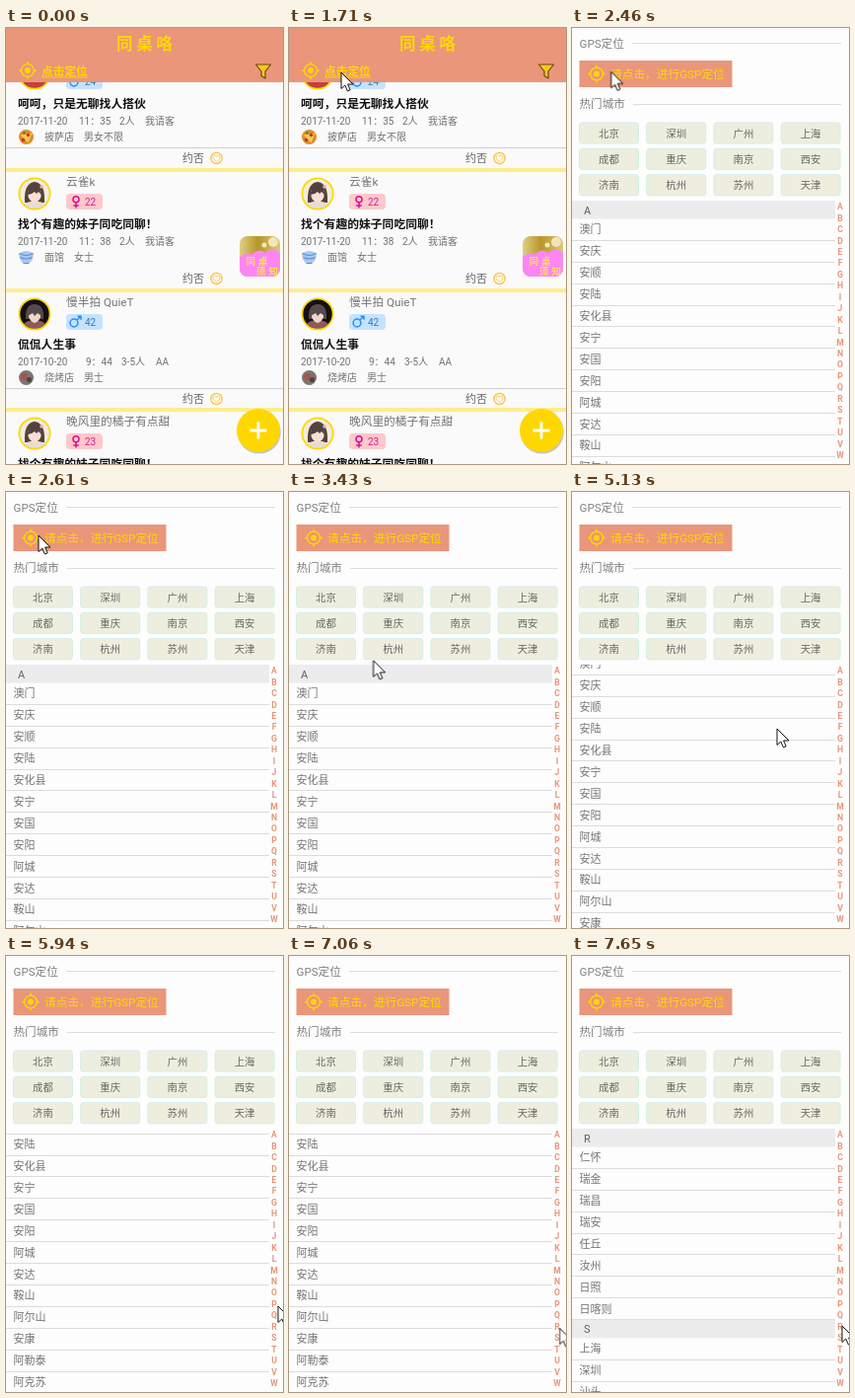
Animation, 281 px wide and 442 px high, one loop 8 s. Source, as an HTML page:

```html
<!DOCTYPE html>
<html lang="zh">
<head>
<meta charset="utf-8">
<title>同桌</title>
<style>
html, body { margin: 0; width: 100%; height: 100%; overflow: hidden; background: #fafafa; }
svg { display: block; }
text { font-family: Roboto, "Noto Sans CJK SC", "Noto Sans CJK", sans-serif; white-space: pre; }
</style>
</head>
<body>
<svg id="stage" width="100%" height="100%" viewBox="0 0 281 442"></svg>
<script>
const LOOP = 8000, SALMON = '#e9967a', GOLD = '#ffd700';

// y is the visual middle of the line
const text = (x, y, s, size, fill, extra = '') =>
  `<text x="${x}" y="${(y + size * 0.37).toFixed(2)}" font-size="${size}" fill="${fill}" ${extra}>${s}</text>`;
const rect = (x, y, w, h, fill, extra = '') =>
  `<rect x="${x}" y="${y}" width="${w}" height="${h}" fill="${fill}" ${extra}/>`;
const circle = (x, y, r, fill, extra = '') =>
  `<circle cx="${x}" cy="${y}" r="${r}" fill="${fill}" ${extra}/>`;
const path = (d, fill, extra = '') => `<path d="${d}" fill="${fill}" ${extra}/>`;
const at = (x, y, body) => `<g transform="translate(${x} ${y})">${body}</g>`;
const BOLD = 'font-weight="700"', MID = 'text-anchor="middle"';

const locate = (x, y) => at(x, y,
  circle(0, 0, 6.4, 'none', `stroke="${GOLD}" stroke-width="1.4"`) + circle(0, 0, 3, GOLD) +
  path('M0-9V-6M0 9V6M-9 0H-6M9 0H6', 'none', `stroke="${GOLD}" stroke-width="1.4"`));

// ---- post list ----
const ring = circle(0, 0, 15.6, 'none', `stroke="${GOLD}" stroke-width="1.8"`);
const avatars = {
  girl: circle(0, 0, 15.5, '#f3ebda') +
    path('M-10 9Q-11-11 0-12Q11-11 10 9Z', '#51423f') +
    path('M-10 11Q-6 7 0 8Q6 7 10 11Q0 19-10 11Z', '#e9dcd6') +
    path('M-6.5-3Q0-6 6.5-3V3Q5 8 0 9Q-5 8-6.5 3Z', '#fae0d2') +
    path('M-7 1Q-7-7 0-7Q7-7 7 1L4-2L2 0L0-2L-3 0Z', '#51423f') +
    circle(7, -7, 1.8, '#f0a9b4') + ring,
  dark: circle(0, 0, 15.5, '#141012') +
    path('M-11 10Q-6 5 0 7Q6 5 11 10Q0 20-11 10Z', '#8f5a5a') +
    path('M-9 5Q-10-10 0-10Q10-10 9 5Z', '#574a4c') +
    path('M-6-2Q0-5 6-2V3Q4 8 0 9Q-4 8-6 3Z', '#efd6cb') +
    path('M-7 2Q-6-6 0-6Q6-6 7 2L3-1L0 2L-2-1Z', '#574a4c') + ring,
  red: circle(0, 0, 15.5, '#8d2b2b') + path('M-13 8Q0 2 13 8Q0 22-13 8Z', '#c6403a') + ring
};
const icons = {
  pizza: circle(0, 0, 7.5, '#e08a2c') + path('M-6-2L6-4L2 6Z', '#f6c94c') +
    circle(-3, 3, 1.8, '#c23b22') + circle(2, -2, 1.8, '#c23b22') + circle(-2, -4, 1.4, '#5d8a35'),
  noodle: path('M-7.5-4Q0-9 7.5-4Q7 6 0 7Q-7 6-7.5-4Z', '#a9c8ee') +
    path('M-7-4Q0 0 7-4M-6 0Q0 3 6 0M-3 6H3', 'none', 'stroke="#5a8fd0" stroke-width="1.1"'),
  grill: circle(0, 0, 7.5, '#7d7472') + circle(-2, -1, 3.5, '#a3564c') + circle(3, 2, 2.6, '#4c4543')
};

function gender(male) {
  const stroke = `stroke="${male ? '#1e90ff' : '#d6128f'}" stroke-width="1.5"`;
  return male
    ? circle(69, 9, 3.9, 'none', stroke) + path('M72 6L76 2M72.5 2.2H76V5.8', 'none', stroke)
    : circle(71, 5.7, 3, 'none', stroke) + path('M71 8.8V14.5M68.2 12H73.8', 'none', stroke);
}

function card(y, c) {
  const grey = '#707070';
  return at(0, y,
    rect(0, 0, 281, 4, '#ffec8b') +
    at(29, 26, avatars[c.face]) +
    text(61, 14, c.name, 11.7, '#757575') +
    at(0, 26, rect(61, 0, 37, 16, c.male ? '#c6e2ff' : '#ffc8cb', 'rx="4"') +
      gender(c.male) + text(80, 8.3, c.age, 10, c.male ? '#3478b8' : '#d0208c')) +
    text(12, 57, c.title, 11.8, '#111', BOLD) +
    text(12, 74, c.date, 10, grey) +
    c.facts.map(([x, s]) => text(x, 74, s, 10, grey)).join('') +
    at(20.5, 90.5, icons[c.icon]) +
    text(39, 90.5, c.shop, 10, grey) +
    text(39 + c.shop.length * 10 + 10, 90.5, c.who, 10, grey) +
    (c.line ? rect(0, 101, 281, 1, '#cfcfcf') : '') +
    text(179, 112, '约否', 11, '#666') +
    at(213.5, 112, circle(0, 0, 5.6, '#fff8e0', 'stroke="#f9c04a" stroke-width="1.3"') +
      path('M0 3.6L-3.4 .2Q-3.6-3-1.6-3Q-.3-2.8 0-1.6Q.3-2.8 1.6-3Q3.6-3 3.4 .2Z', '#fff',
        'stroke="#f9c04a" stroke-width=".8"')));
}

const cards = [
  { face: 'red', name: '', male: true, age: 24, title: '呵呵，只是无聊找人搭伙', line: true, date: '2017-11-20',
    facts: [[74, '11：35'], [115, '2人'], [141, '我请客']], icon: 'pizza', shop: '披萨店', who: '男女不限' },
  { face: 'girl', name: '云雀k', male: false, age: 22, title: '找个有趣的妹子同吃同聊！', line: false, date: '2017-11-20',
    facts: [[74, '11：38'], [115, '2人'], [141, '我请客']], icon: 'noodle', shop: '面馆', who: '女士' },
  { face: 'dark', name: '慢半拍 QuieT', male: true, age: 42, title: '侃侃人生事', line: true, date: '2017-10-20',
    facts: [[81, '9：44'], [117, '3-5人'], [152, 'AA']], icon: 'grill', shop: '烧烤店', who: '男士' },
  { face: 'girl', name: '晚风里的橘子有点甜', male: false, age: 23, title: '找个有趣的妹子同吃同聊！', line: true, date: '2017-11-20',
    facts: [], icon: 'noodle', shop: '面馆', who: '女士' }
];

const notice = at(237, 211,
  '<g clip-path="url(#tile)">' + rect(0, 0, 41, 41, 'url(#tileFill)') +
  path('M0 21Q6 15 12 19Q19 11 26 17Q33 10 41 17V41H0Z', '#fb86f3') +
  circle(34, 6, 5, '#f1e6bb') + circle(25, 9, 2.5, '#f1e6bb') + '</g>' +
  text(6.5, 25, '同桌', 9.5, '#ffe34a', BOLD + ' letter-spacing="3"') +
  text(17, 35, '须知', 9.5, '#ffe34a', BOLD + ' letter-spacing="3"'));

const home =
  rect(0, 0, 281, 442, '#fafafa') +
  cards.map((c, i) => card(Math.round(20 + i * 121.8), c)).join('') +
  rect(0, 0, 281, 55, SALMON) +
  text(112, 16, '同桌咯', 16.5, GOLD, BOLD + ' letter-spacing="3.8"') +
  locate(22, 43) + text(36, 44, '点击定位', 11.7, GOLD, BOLD) + rect(36, 49.5, 47, 1, GOLD) +
  path('M253.5 37H268.5L263 44V51L259 48.5V44Z', '#f2c81c', 'stroke="#6b4a12" stroke-width="1.2" stroke-linejoin="round"') +
  notice +
  circle(256.8, 409.6, 22, '#000', 'opacity=".22"') +
  circle(256, 408, 22, GOLD) +
  path('M247.5 408H264.5M256 399.5V416.5', 'none', 'stroke="#fff" stroke-width="2.8"');

// ---- city picker ----
const ROW = 21.9, HEAD = 18.6, LEFT = 7.5;

function section(y, letter, names) {
  return rect(0, y, 267, HEAD, '#ececec') + text(12, y + 9.6, letter, 11, '#606060') +
    names.split(' ').map((name, i) => {
      const top = y + HEAD + i * ROW;
      return text(LEFT, top + 10.8, name, 11, '#737373') +
        rect(0, Math.round(top + ROW - 0.6), 267, 1, '#dcdcdc');
    }).join('');
}

const hot = '北京 深圳 广州 上海 成都 重庆 南京 西安 济南 杭州 苏州 天津'.split(' ').map((name, i) => {
  const x = LEFT + (i % 4) * 68.2, y = 96 + Math.floor(i / 4) * 26.4;
  return rect(x, y, 60, 21, '#eeeede', 'rx="2.5" stroke="#cdeee9" stroke-width=".9"') +
    text(x + 30, y + 10.8, name, 10.4, '#666', MID);
}).join('');

const letters = [...'ABCDEFGHIJKLMNOPQRSTUVW'].map((c, i) =>
  text(272, 181 + i * 11.45, c, 8.6, SALMON, BOLD + ' ' + MID)).join('');

const city =
  rect(0, 0, 281, 442, '#fdfdfd') +
  text(LEFT, 16, 'GPS定位', 11.6, '#808080') + rect(61, 15, 212, 1, '#dcdcdc') +
  rect(LEFT, 33, 155, 27, SALMON) + locate(25, 46.5) +
  text(39, 46.5, '请点击，进行GSP定位', 11.7, GOLD) +
  text(LEFT, 77, '热门城市', 11.6, '#808080') + rect(62, 77, 211, 1, '#dcdcdc') +
  hot +
  '<g clip-path="url(#listBox)"><g id="listA">' +
  section(175, 'A', '澳门 安庆 安顺 安陆 安化县 安宁 安国 安阳 阿城 安达 鞍山 阿尔山 安康 阿勒泰 阿克苏 安丘') +
  '</g><g id="listR">' +
  section(175, 'R', '仁怀 瑞金 瑞昌 瑞安 任丘 汝州 日照 日喀则') +
  section(175 + HEAD + 8 * ROW, 'S', '上海 深圳 汕头') +
  '</g></g>' + letters;

document.getElementById('stage').innerHTML = `
  <defs>
    <clipPath id="listBox"><rect y="175" width="267" height="267"/></clipPath>
    <clipPath id="tile"><rect width="41" height="41" rx="8"/></clipPath>
    <linearGradient id="tileFill"><stop stop-color="#e0cf86"/><stop offset=".45" stop-color="#b8962a"/><stop offset="1" stop-color="#dcc777"/></linearGradient>
  </defs>
  <g>${home}</g><g id="city">${city}</g>
  <g id="cursor">${path('M0 0V16.5L3.8 13L6.4 19L9.2 17.8L6.6 12H12Z', '#fff', 'stroke="#111" stroke-width="1" stroke-linejoin="round"')}</g>`;

// ---- motion ----
const shift = (x, y) => `translate(${x}px, ${y}px)`;

// steps: [time, style]; each style holds until the next one
function play(id, steps) {
  const frames = steps.map(([time, style]) => ({ ...style, offset: time / LOOP, easing: 'step-end' }));
  frames.push({ ...steps[steps.length - 1][1], offset: 1 });
  document.getElementById(id).animate(frames, { duration: LOOP, iterations: Infinity });
}

// [start, end, steps, x, y] of each pointer move
const moves = [
  [780, 780, 1, 174, 377], [910, 1710, 7, 53, 45], [2300, 2610, 3, 33, 44],
  [2880, 3730, 7, 125, 266], [4010, 4160, 2, 125, 138], [4470, 4470, 1, 171, 157],
  [4590, 5130, 5, 208, 240], [5280, 5490, 3, 255, 304], [5640, 5940, 3, 276, 355],
  [6090, 6360, 3, 276, 389], [6500, 6630, 2, 276, 384], [6760, 7210, 4, 274, 375]
];
const trail = [[0, { transform: shift(-40, -40) }]];
let px = -40, py = -40;
for (const [start, end, n, x, y] of moves) {
  for (let k = 1; k <= n; k++) {
    const time = n > 1 ? start + (end - start) * (k - 1) / (n - 1) : start;
    trail.push([time, { transform: shift(px + (x - px) * k / n, py + (y - py) * k / n) }]);
  }
  [px, py] = [x, y];
}
play('cursor', trail);

play('city', [
  [0, { opacity: 0, transform: shift(0, 24) }],
  [2300, { opacity: 0.5, transform: shift(0, 16) }],
  [2455, { opacity: 1, transform: shift(0, 0) }]
]);

const scroll = [[0, 0], [4860, 3], [4995, 14], [5130, 30], [5280, 56], [5385, 71], [5490, 79]];
play('listA', [
  ...scroll.map(([time, y]) => [time, { transform: shift(0, -y), visibility: 'visible' }]),
  [7650, { transform: shift(0, -79), visibility: 'hidden' }]
]);
play('listR', [[0, { visibility: 'hidden' }], [7650, { visibility: 'visible' }]]);
</script>
</body>
</html>
```
